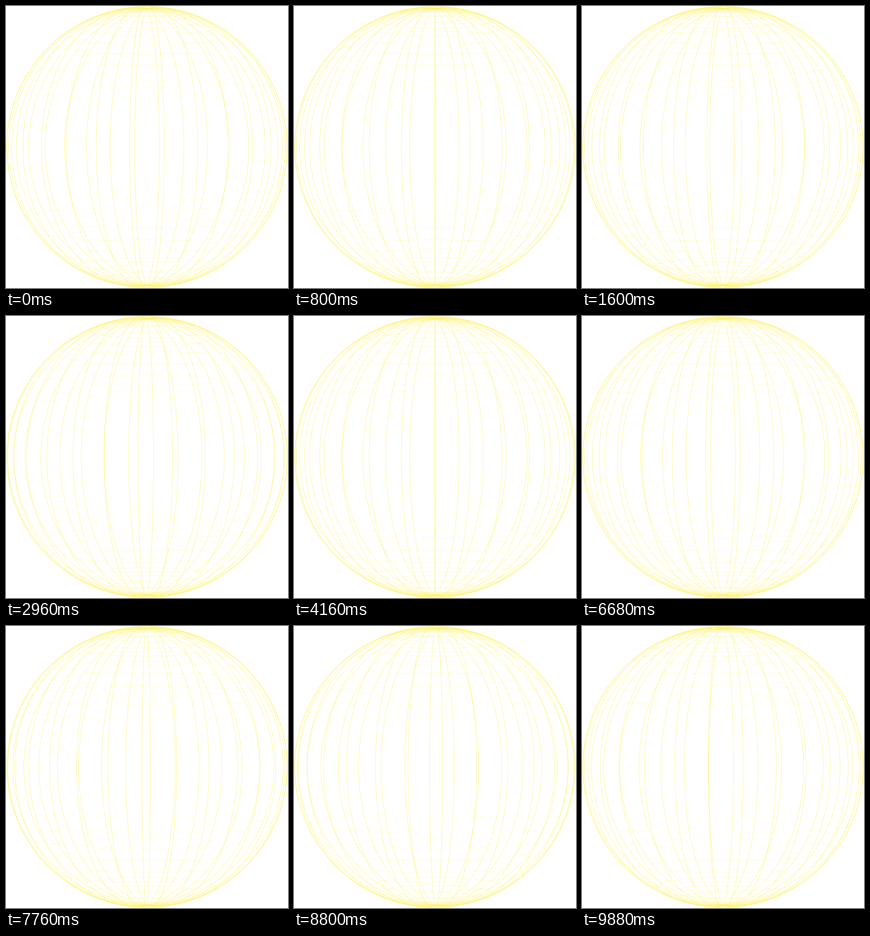
Recreate the animation shown at these times as an HTML page with a canvas. Size 282x282 px, loop 10000 ms.

```html
<!DOCTYPE html>
<html lang="en">
<head>
<meta charset="utf-8">
<title>Turning globe</title>
<style>
  html, body { margin: 0; width: 100%; height: 100%; overflow: hidden; background: #fff; }
  canvas { display: block; width: 100vw; height: 100vh; }
</style>
</head>
<body>
<canvas id="globe" width="282" height="282"></canvas>
<script>
const ctx = document.getElementById("globe").getContext("2d");
const LOOP = 10000, C = 141, R = 140.3;
const EYE = 6;                                // viewing distance in globe radii
const FOCUS = R * Math.sqrt(EYE * EYE - 1);   // makes the outline R wide
const rad = deg => deg * Math.PI / 180;

// Steps last 160, 120 and 120 ms, in turn.
function stepAt(t) {
  const rest = t % 400;
  return 3 * Math.floor(t / 400) + (rest < 160 ? 0 : rest < 280 ? 1 : 2);
}

function project(lat, lon) {
  const ring = Math.cos(rad(lat));
  const scale = FOCUS / (EYE - ring * Math.cos(rad(lon)));
  return [C + scale * ring * Math.sin(rad(lon)), C - scale * Math.sin(rad(lat))];
}

function curve(alpha, from, to, point) {
  ctx.globalAlpha = alpha;
  ctx.beginPath();
  for (let a = from; a <= to; a += 4) ctx.lineTo(...point(a));
  ctx.stroke();
}

function draw(t) {
  const turn = 6 - 0.96 * stepAt(t);
  ctx.globalAlpha = 1;
  ctx.fillStyle = "#fff";
  ctx.fillRect(0, 0, 282, 282);
  ctx.strokeStyle = "#fff066";
  ctx.lineWidth = 1;
  for (let lon = 0; lon < 360; lon += 12)
    curve(0.36, -90, 90, lat => project(lat, lon + turn));
  for (let lat = 24; lat < 90; lat += 6)
    for (const side of [-lat, lat])
      curve(0.04 + 0.0015 * lat, 0, 360, lon => project(side, lon));
  curve(0.35, 0, 360, a => [C + R * Math.cos(rad(a)), C + R * Math.sin(rad(a))]);
}

const start = performance.now();
function tick() {
  draw((performance.now() - start) % LOOP);
  requestAnimationFrame(tick);
}
tick();
</script>
</body>
</html>
```
